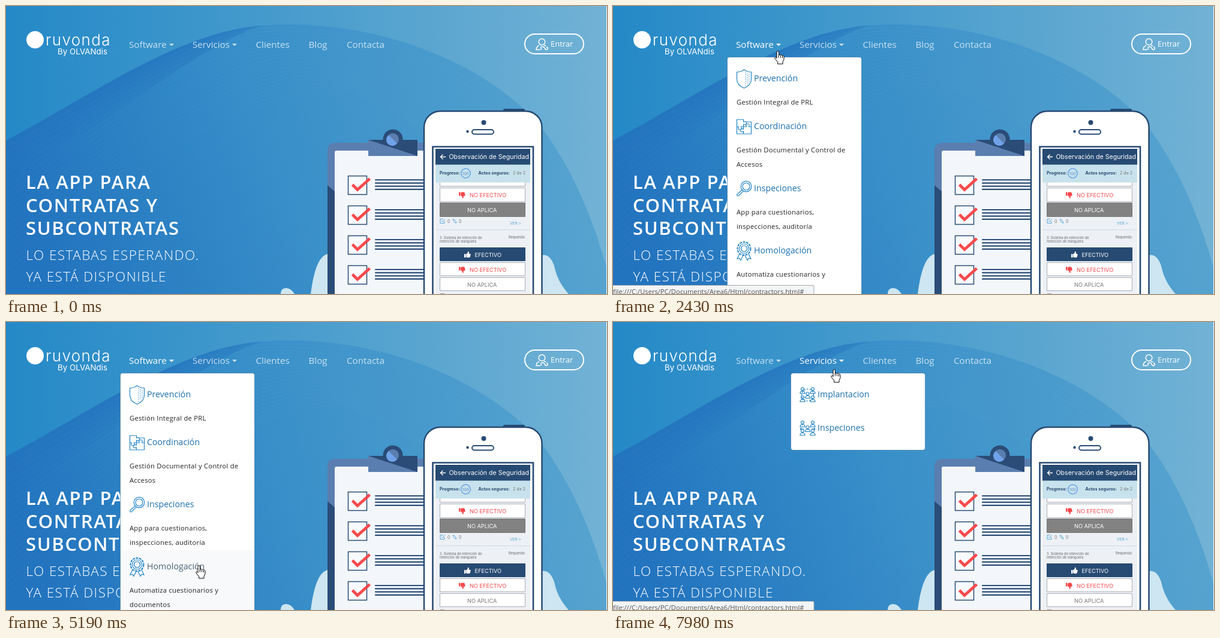
Animation of 1002x482 px, one loop 8000 ms. Source, as an HTML page:

```html
<!DOCTYPE html>
<html lang="es">
<head>
<meta charset="utf-8">
<style>
html, body { margin: 0; width: 100%; height: 100%; overflow: hidden; background: #3f94ca }
svg { display: block; width: 100vw; height: 100vh }
text { font-family: "Open Sans", "Noto Sans", sans-serif; white-space: pre }
.app text, .brand text { font-family: Inter, Roboto, sans-serif }
.nav { font-size: 15.2px; fill: #fff; opacity: .72 }
.nav.on { opacity: 1 }
.h1 text { font-size: 31px; font-weight: 600; letter-spacing: 1.65px; fill: #fff }
.h2 text { font-size: 22.5px; font-weight: 300; letter-spacing: 1.45px; fill: #fff }
.menu .title { font-size: 14.2px; fill: #1a6fad }
.menu .desc { font-size: 11.2px; letter-spacing: .28px; fill: #222 }
.menu .icon { fill: none; stroke: #2384c6; stroke-width: 1.2 }
.menu .row { fill: #fff }
.on .row { fill: #f8f9fa }
.on .title { fill: #48627a }
.status text { font-size: 11.2px; fill: #555 }
.btn { font-size: 9.2px }
.tiny { font-size: 5.6px; fill: #666 }
.small { font-size: 7.1px; font-weight: 700; fill: #274a73 }
</style>
</head>
<body>
<svg viewBox="0 0 1002 482" preserveAspectRatio="none">
<defs>
  <linearGradient id="sky"><stop stop-color="#2489c7"/><stop offset=".5" stop-color="#4a9dcd"/><stop offset="1" stop-color="#72b2d5"/></linearGradient>
  <linearGradient id="wave" x1="0" y1=".5" x2="1" y2=".3"><stop stop-color="#2270bd" stop-opacity=".85"/><stop offset=".45" stop-color="#3088c6" stop-opacity=".6"/><stop offset="1" stop-color="#4198cb" stop-opacity=".5"/></linearGradient>
  <linearGradient id="edge" gradientUnits="userSpaceOnUse" x1="0" y1="215" x2="30" y2="273"><stop stop-color="#2273bd" stop-opacity=".75"/><stop offset="1" stop-color="#2273bd" stop-opacity="0"/></linearGradient>
  <g id="check">
    <path d="M570.500 284.500h31v31h-31z" fill="#f8fbfd" stroke="#2a4c77" stroke-width="1.500"/>
    <path d="M577.500 299l8.500 8.500L606.500 289" fill="none" stroke="#f9494c" stroke-width="4.800"/>
    <path d="M616 291h82m-82 5.300h82m-82 5.300h82m-82 5.300h82" stroke="#2a4c77" stroke-width="2.200" stroke-linecap="round"/>
  </g>
  <path id="thumb" d="M-5-1h2.500v6H-5zM-1.800-.8L.6-2.500 1-5.200q2.200-.2 2 2L2.700-1.300H5q1 .5.600 1.800L4.600 4Q4.200 5 3 5H0L-1.800 4z"/>
  <g id="person"><circle r="2.500"/><path d="M-4 7.500q0-4 4-4t4 4z"/></g>
</defs>

<path fill="url(#sky)" d="M0 0h1002v482H0z"/>
<path fill="url(#wave)" d="M0 225C150 145 290 42 430 32 600 20 790 85 890 200Q960 290 1002 440V482H0z"/>
<path fill="url(#edge)" d="M0 225C150 145 290 42 430 32 330 60 200 180 0 290z"/>
<g id="lines" fill="none" stroke="#bfe4ff" stroke-opacity=".04"/>
<path fill="#fff" d="M1001 0h1v482h-1z"/>

<g fill="#cde6f1">
  <path d="M458 482q0-10 9-10 8 0 14 10zM508 482Q516 418 537 415V482zM893 417q14-3 21 18 5 26 24 47h-45z"/>
</g>
<path d="M536 482V242q0-13 13-13H700V482z" fill="#5a7eaf"/>
<path d="M536 300l14 12V482h-14z" fill="#2a4c77"/>
<path d="M548 482V245q0-3 3-3H700V482z" fill="#f3f7fb"/>
<circle cx="645" cy="223" r="16.500" fill="#2a4c77"/>
<path d="M604 224h82v27h-82z" fill="#2a4c77"/>
<path d="M604 224v27h82z" fill="#5a7eaf"/>
<circle cx="645" cy="223" r="10" fill="#5a7eaf"/>
<path d="M638 216a10 10 0 1 0 14 14z" fill="#70a2ea"/>
<use href="#check"/><use href="#check" y="50"/><use href="#check" y="100"/><use href="#check" y="150"/>

<g class="app">
  <rect x="829" y="172" width="36" height="8" rx="2" fill="#274a73"/>
  <rect x="697" y="176" width="196.500" height="340" rx="27" fill="#fff" stroke="#274a73" stroke-width="2.500"/>
  <g fill="#274a73"><circle cx="796.500" cy="195" r="4"/><circle cx="769.500" cy="210" r="2.200"/></g>
  <rect x="777" y="207" width="36" height="7.500" rx="3.700" fill="none" stroke="#274a73" stroke-width="2"/>
  <path d="M711.500 490V235.500h167.500V490" fill="#fff" stroke="#274a73" stroke-width="2.600"/>
  <path d="M716 295h158v187H716z" fill="#edf0f5"/>
  <path d="M716 239h158v27H716z" fill="#274a73"/>
  <path d="M716 265.500h158v30H716z" fill="#c7e2ec"/>
  <path d="M733 252.500h-8.500m4-4l-4 4 4 4" fill="none" stroke="#fff" stroke-width="1.300"/>
  <text x="738.500" y="255.500" font-size="10.600" fill="#fff">Observación de Seguridad</text>
  <text x="723" y="282" class="small">Progreso:</text>
  <circle cx="766.500" cy="280" r="7.800" fill="none" stroke="#5d9ee6" stroke-width="1.300"/>
  <text x="766.500" y="282.500" text-anchor="middle" font-size="6.500" fill="#5d8fc5">100</text>
  <text x="787.500" y="282" class="small">Actos seguros:</text>
  <text x="845" y="282" font-size="7.100" fill="#777">2 de 2</text>
  <g fill="#fff" stroke="#a9adb5">
    <path d="M723.500 295.500v6h142v-6M723.500 304.500h142v23h-142zM723.500 429.500h142v22h-142zM723.500 454.500h142v22h-142z"/>
    <path d="M723.500 329.500h142v23h-142z" fill="#828282" stroke="#777"/>
    <path d="M723.500 404.500h142v22h-142z" fill="#274a73" stroke="#274a73"/>
  </g>
  <g class="btn" fill="#f4474a">
    <text x="773" y="320">NO EFECTIVO</text><text x="773" y="445">NO EFECTIVO</text>
    <use href="#thumb" transform="translate(760 316.500) scale(1 -1)"/>
    <use href="#thumb" transform="translate(760 441.500) scale(1 -1)"/>
  </g>
  <g class="btn" fill="#fff">
    <text x="769" y="344.500">NO APLICA</text><text x="781.500" y="419.500">EFECTIVO</text>
    <use href="#thumb" x="769" y="416"/>
  </g>
  <text class="btn" x="769" y="469.500" fill="#777">NO APLICA</text>
  <g fill="none" stroke="#5ba7d6">
    <path d="M731 360v3.500h-7v-7h5m-3 2.500l2 2 4-4.500M745 358l4 5q2 1 2-1l-4-5q-2-1-2 1"/>
    <path d="M724 482v-.5h7" stroke="#999"/>
    <path d="M716 374.500h158" stroke="#d3dbe5"/>
  </g>
  <g font-size="7" fill="#777"><text x="736" y="363">0</text><text x="755" y="363">0</text>
  <text x="840" y="365.500" fill="#5ba7d6" font-size="6.600">VER &gt;</text></g>
  <text class="tiny" x="723" y="390">3. Sistema de retención de</text>
  <text class="tiny" x="723" y="396">retención de manguera</text>
  <text class="tiny" x="838" y="389">Requerido</text>
</g>

<g class="brand" fill="#fff">
  <circle cx="48.500" cy="56.500" r="14.500"/>
  <text x="66" y="66" font-size="26" font-weight="300" letter-spacing="1.400">ruvonda</text>
  <text x="86" y="81" font-size="13.400">By OLVANdis</text>
</g>
<g id="nav1" class="nav"><text x="205" y="70">Software</text><path d="M272 63h8l-4 4z"/></g>
<g id="nav2" class="nav"><text x="311" y="70">Servicios</text><path d="M377 63h8l-4 4z"/></g>
<g class="nav"><text x="416.500" y="70">Clientes</text><text x="504.500" y="70">Blog</text><text x="568" y="70">Contacta</text></g>
<rect x="865" y="47" width="98" height="33" rx="16.500" fill="none" stroke="#fff" stroke-width="2"/>
<g fill="none" stroke="#fff" stroke-width="1.500">
  <circle cx="893.500" cy="60" r="5.300"/>
  <path d="M889 66q-5 2-5 7h7M897 65.500l3 1.500M893 73q-3-4 1-5 3 0 4 2.500 1 3 4 2.500 3-3-1-4.500"/>
</g>
<text x="908" y="68" font-size="13" fill="#fff">Entrar</text>

<g class="h1"><text x="33" y="306">LA APP PARA</text><text x="33" y="345">CONTRATAS Y</text><text x="33" y="383">SUBCONTRATAS</text></g>
<g class="h2"><text x="33.500" y="425">LO ESTABAS ESPERANDO.</text><text x="33.500" y="461">YA ESTÁ DISPONIBLE</text></g>

<g id="menu1" class="menu">
  <rect x="190.500" y="85.500" width="224" height="420" rx="4" fill="#fff" stroke="#1d5f93" stroke-opacity=".55"/>
  <g class="item">
    <path class="row" d="M191 94h223v80H191z"/>
    <path class="icon" d="M218.500 106.500q5 4 12 4v12q0 10-12 15-12-5-12-15v-12q7 0 12-4z"/>
    <path class="icon" stroke-dasharray="1 2" d="M221 111v22m3-20v18m3-17v13"/>
    <text class="title" x="235" y="126">Prevención</text>
    <text class="desc" x="206" y="165">Gestión Integral de PRL</text>
  </g>
  <g class="item">
    <path class="row" d="M191 174h223v104H191z"/>
    <path class="icon" d="M206.500 190h11v4q5-2 5 2t-5 2v4h-4q2 5-2 5t-2-5h-3zM206.500 202v12h11v-4q-5 2-5-2t5-2v-4M217.500 214h13v-12h-4q2-5-2-5t-2 5h-5m13 0v-8h-8"/>
    <text class="title" x="235" y="206">Coordinación</text>
    <text class="desc" x="206" y="245">Gestión Documental y Control de</text>
    <text class="desc" x="206" y="269">Accesos</text>
  </g>
  <g class="item">
    <path class="row" d="M191 278h223v104H191z"/>
    <g class="icon"><circle cx="222" cy="302" r="8.800"/><circle cx="222" cy="302" r="6"/><path d="M215 308l-8 7q-1 2 1 3 2 0 2-1l7-7"/></g>
    <text class="title" x="235" y="310">Inspeciones</text>
    <text class="desc" x="206" y="349">App para cuestionarios,</text>
    <text class="desc" x="206" y="373">inspecciones, auditoría</text>
  </g>
  <g class="item">
    <path class="row" d="M191 382h223v100H191z"/>
    <g class="icon"><circle cx="218.500" cy="406" r="11" stroke-width="2" stroke-dasharray="4 1.500"/><circle cx="218.500" cy="406" r="8"/><circle cx="218.500" cy="406" r="5"/><path d="M211 415l-4 8 4-.5 2 3 4-8m9-2.500l4 8-4-.5-2 3-4-8"/></g>
    <text class="title" x="235" y="414">Homologación</text>
    <text class="desc" x="206" y="453">Automatiza cuestionarios y</text>
    <text class="desc" x="206" y="477">documentos</text>
  </g>
</g>

<g id="menu2" class="menu">
  <rect x="296.500" y="85.500" width="224" height="129" rx="4" fill="#fff" stroke="#1d5f93" stroke-opacity=".55"/>
  <g class="icon">
    <g id="team"><use href="#person" x="316" y="112"/><use href="#person" x="333" y="112"/><use href="#person" x="316" y="126"/><use href="#person" x="333" y="126"/><use href="#person" x="324.500" y="120"/></g>
    <circle cx="324.500" cy="122" r="10" stroke-dasharray="3 2"/>
    <use href="#team" y="56"/>
    <path d="M312 179h6m-6 0l2-2m-2 2l2 2M337 179h-6m6 0l-2-2m2 2l-2 2"/>
  </g>
  <text class="title" x="341" y="126">Implantacion</text>
  <text class="title" x="341" y="182">Inspeciones</text>
</g>

<g id="status" class="status">
  <path fill="#f3f4f5" stroke="#a3a7ab"/>
  <text x="0" y="482"></text>
</g>
<g id="cursor" stroke-linejoin="round">
  <path id="arrow" d="M0 0V16.500l3.800-3.600 2.800 6 2.400-1-2.700-5.900H11.500z" fill="#fff" stroke="#000"/>
  <g id="hand"><path d="M-1.500 12V1.700a1.700 1.700 0 0 1 3.400 0V7a1.700 1.700 0 0 1 3.100.3 1.700 1.700 0 0 1 3 .6 1.600 1.600 0 0 1 2.500 1.300V14l-2 4v3.500H.2V18.500L-4.500 12.500a1.600 1.600 0 0 1 2.400-2z" fill="#fff" stroke="#000"/><path d="M1.900 7v4M5 8v3M8 8.500v3" stroke="#000"/></g>
</g>
</svg>
<script>
const $ = id => document.getElementById(id);
const LOOP = 8000;
const FILE = "file:///C:/Users/PC/Documents/Area6/Html/contractors.html#";
const LINK = "https://www.6conecta.com/software-coordinacion-actividades-empresariales";

// pointer path: time, x, y
const path = [
  [110, 917, 416], [450, 790, 250], [680, 640, 158], [900, 553, 180], [1300, 405, 140],
  [1770, 273, 78], [1870, 274, 75], [2760, 274, 75], [3490, 289, 221], [3650, 287, 224],
  [4310, 298, 318], [5130, 320, 403], [5190, 321, 407], [5450, 458, 335], [5680, 432, 180],
  [5970, 290, 62], [6100, 280, 58], [6380, 276, 68], [6510, 276, 68], [6840, 303, 60],
  [7000, 350, 64], [7200, 366, 69], [7920, 366, 69], [7980, 368, 79], [8000, 368, 79]
];

const same = (a, b) => a[1] === b[1] && a[2] === b[2];

function slope(i, k) {
  const a = path[i - 1], p = path[i], b = path[i + 1];
  if (!a || !b || same(a, p) || same(p, b)) return 0;
  return (b[k] - a[k]) / (b[0] - a[0]);
}

function pointer(t) {
  let i = 0;
  while (i < path.length - 2 && t >= path[i + 1][0]) i++;
  const a = path[i], b = path[i + 1], d = b[0] - a[0];
  const u = Math.max(0, (t - a[0]) / d), v = 1 - u;
  return [1, 2].map(k => v * v * (1 + 2 * u) * a[k] + u * u * (3 - 2 * u) * b[k]
    + d * u * v * (v * slope(i, k) - u * slope(i + 1, k)));
}

const show = (el, on) => el.style.display = on ? "" : "none";
const light = (el, on) => el.classList.toggle("on", on);
const within = (t, a, b) => t >= a && t < b;
const items = [...document.querySelectorAll(".item")];
const rowTops = [94, 174, 278, 382, 482];
const [bar, label] = $("status").children;

$("lines").innerHTML = Array.from({ length: 22 }, (_, i) =>
  `<path d="M0 ${225 + i * 11}C150 ${145 + i * 9} 290 ${42 + i * 6} ${430 + i * 6} ${32 + i * 5}
   ${600 + i * 8} ${20 + i * 9} 790 ${85 + i * 12} 1002 ${330 + i * 14}"/>`).join("");

function draw() {
  const t = performance.now() % LOOP;
  const [x, y] = pointer(t);
  const open1 = within(t, 2430, 6510), open2 = t >= 7350;
  const onBar = y > 45 && y < 86;
  const over1 = onBar && within(x, 197, 289), over2 = onBar && within(x, 304, 394);
  const inMenu = open1 && within(x, 191, 414);

  let row = -1;
  items.forEach((el, i) => {
    const on = inMenu && within(y, rowTops[i], rowTops[i + 1]);
    if (on) row = i;
    light(el, on);
  });
  light($("nav1"), open1 || t > 1700 && over1);
  light($("nav2"), open2 || over2);
  show($("menu1"), open1);
  show($("menu2"), open2);

  const url = within(t, 2090, 3330) || t >= 6640 ? FILE : within(t, 3330, 4060) ? LINK : "";
  show($("status"), url);
  label.textContent = url;
  bar.setAttribute("d", `M-1 467.500H${url === LINK ? 413 : 333}q2 0 2 2V490H-1z`);

  const hand = over1 || over2 || row >= 0;
  show($("cursor"), t >= 110);
  show($("hand"), hand);
  show($("arrow"), !hand);
  $("cursor").setAttribute("transform", `translate(${Math.round(x) + .5} ${Math.round(y) + .5})`);
  requestAnimationFrame(draw);
}
draw();
</script>
</body>
</html>
```
